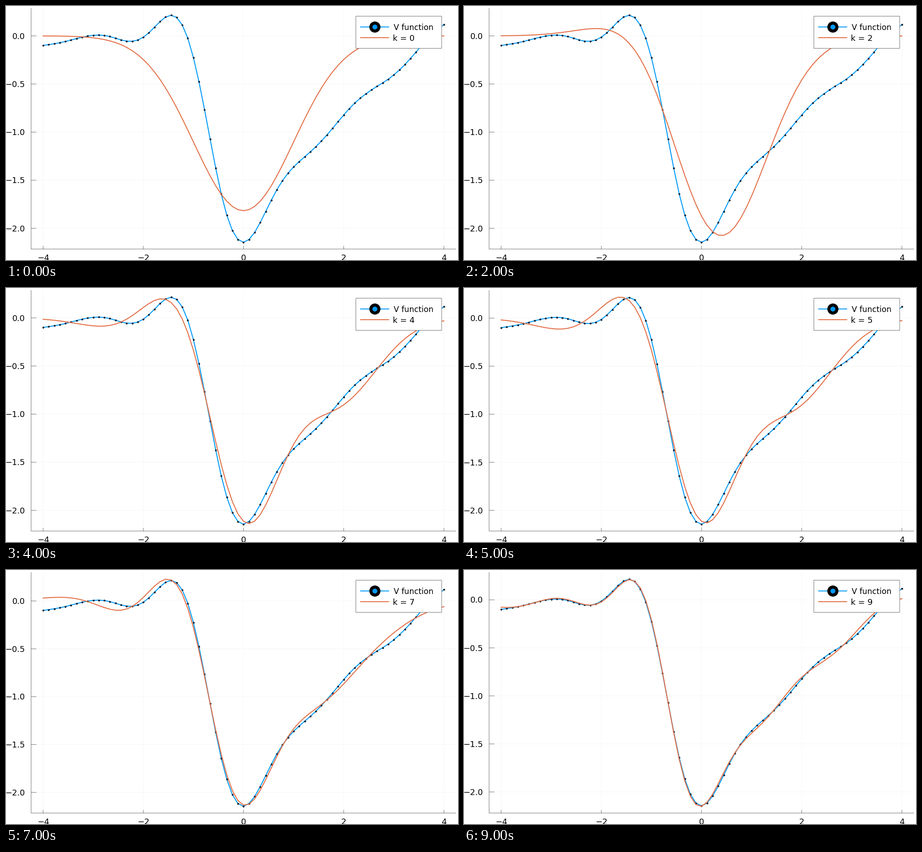
Recreate the animation shown at these times as a matplotlib script. Size 998 by 561 pixels, loop 10 s.

```python
import numpy as np
import matplotlib.pyplot as plt
from matplotlib.animation import FuncAnimation

W, H, DPI = 998, 561, 100
LEFT, RIGHT, TOP, BOTTOM = 55.4, 993.4, 5.4, 536.8
BLUE, ORANGE, GREY, PALE = "#009afa", "#e36f47", "#707070", "#f6f6f6"
PX = 72 / DPI  # points per pixel
TICK_SIZE = 18

plt.rcParams["font.family"] = "DejaVu Sans"
plt.rcParams["path.snap"] = False


def spline(xk, yk, x):
    """Natural cubic spline on evenly spaced knots."""
    n, h = len(xk), xk[1] - xk[0]
    A = np.eye(n)
    for i in range(1, n - 1):
        A[i, i - 1:i + 2] = 1, 4, 1
    rhs = np.zeros(n)
    rhs[1:-1] = 6 * np.diff(yk, 2) / h**2
    m = np.linalg.solve(A, rhs)
    i = np.clip(((x - xk[0]) / h + 1e-9).astype(int), 0, n - 2)
    b = (x - xk[i]) / h
    a = 1 - b
    bend = (a**3 - a) * m[i] + (b**3 - b) * m[i + 1]
    return a * yk[i] + b * yk[i + 1] + bend * h**2 / 6


def hermite_functions(x, count):
    """Oscillator eigenfunctions, by recurrence."""
    psi = [np.pi**-0.25 * np.exp(-x**2 / 2)]
    psi.append(np.sqrt(2) * x * psi[0])
    for n in range(2, count):
        psi.append(np.sqrt(2 / n) * x * psi[-1] - np.sqrt((n - 1) / n) * psi[-2])
    return np.array(psi[:count])


KNOTS = np.array([
    -.099, -.082, -.0585, -.028, -.002, .0085, -.007, -.042, -.056, -.014,
    .0895, .1955, .191, -.0255, -.477, -1.0715, -1.643, -2.0235, -2.1445,
    -2.0425, -1.8235, -1.598, -1.4265, -1.3065, -1.2055, -1.0925, -.961,
    -.822, -.6975, -.6015, -.5235, -.4505, -.3545, -.2345, -.1005, .0195, .118])

x = np.linspace(-4, 4, 73)
v = spline(np.linspace(-4, 4, len(KNOTS)), KNOTS, x)
psi = hermite_functions(x, 10)
coef = psi @ v / (psi**2).sum(axis=1)
sums = np.cumsum(coef[:, None] * psi, axis=0)

fig = plt.figure(figsize=(W / DPI, H / DPI), dpi=DPI, facecolor="white")
ax = fig.add_axes([0, 0, 1, 1])
ax.set_xlim(0, W)
ax.set_ylim(H, 0)
ax.axis("off")


def line(xs, ys, color, width, z, **kw):
    return ax.plot(xs, ys, color=color, lw=width * PX, zorder=z, **kw)[0]


def dots(xs, ys, size, edge, z):
    return line(xs, ys, "none", 0, z, marker="o", ms=size * PX, mfc=BLUE,
                mec="black", mew=edge * PX)


def label(px, py, text, size, ha, z=2):
    return ax.text(px, py + 0.365 * size, text, fontsize=size * PX, ha=ha,
                   va="baseline", color="black", zorder=z)


def to_px(t):
    return LEFT + (t + 4.24) / 8.48 * (RIGHT - LEFT)


def number(t, digits):
    return f"{t:.{digits}f}".replace("-", "\u2212")


xp = to_px(x)

# Fixed axes
line([LEFT, LEFT, RIGHT], [TOP, BOTTOM, BOTTOM], GREY, 1, 2)
for t in range(-4, 5, 2):
    line([to_px(t)] * 2, [TOP, BOTTOM], PALE, 1, 1)
    line([to_px(t)] * 2, [BOTTOM - 6.4, BOTTOM], GREY, 1, 2)
    label(to_px(t), 555, number(t, 0), TICK_SIZE, "center")

# Vertical scale, moved with the data limits
levels = [0.0, -0.5, -1.0, -1.5, -2.0]
grid = [line([LEFT, RIGHT], [0, 0], PALE, 1, 1) for _ in levels]
ticks = [line([LEFT, LEFT + 11.3], [0, 0], GREY, 1, 2) for _ in levels]
names = [label(41.8, 0, number(t, 1), TICK_SIZE, "right") for t in levels]

# Curves
v_line = line(xp, xp, BLUE, 2.1, 3)
v_dots = dots(xp, xp, 2.6, 1.4, 4)
fit_line = line(xp, xp, ORANGE, 2.1, 5)

# Legend
ax.add_patch(plt.Rectangle((772.5, 22.5), 189.5, 71, fc="white", ec=GREY,
                           lw=PX, zorder=6))
line([783, 845], [46.3, 46.3], BLUE, 2, 7)
dots([814.4], [46.3], 17.7, 6.8, 8)
line([783, 845], [70, 70], ORANGE, 2, 7)
label(856, 46.5, "V function", 17.2, "left", 8)
k_text = label(854, 70.5, "", 18, "left", 8)


def update(k):
    fit = sums[k]
    low, high = min(v.min(), fit.min()), max(v.max(), fit.max())
    pad = 0.03 * (high - low)
    scale = (BOTTOM - TOP) / (high - low + 2 * pad)

    def y_px(t):
        return TOP + (high + pad - t) * scale

    v_line.set_ydata(y_px(v))
    v_dots.set_ydata(y_px(v))
    fit_line.set_ydata(y_px(fit))
    for t, g, tick, name in zip(levels, grid, ticks, names):
        y = y_px(t)
        g.set_ydata([y, y])
        tick.set_ydata([y, y])
        name.set_y(y + 0.365 * TICK_SIZE)
    k_text.set_text(f"k = {k}")
    return [v_line, v_dots, fit_line, k_text, *grid, *ticks, *names]


anim = FuncAnimation(fig, update, frames=10, interval=1000, repeat=True,
                     repeat_delay=0, blit=False)
plt.show()
```
